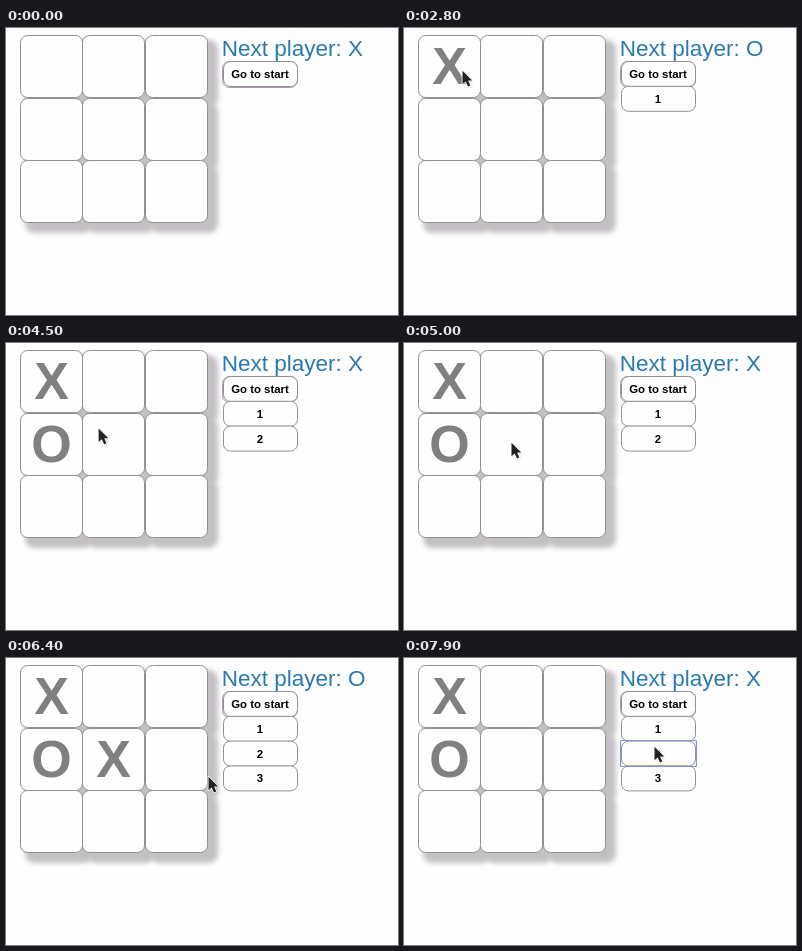
An HTML page that plays this animation: 392x287 px, repeating every 8 s.

```html
<!DOCTYPE html>
<html lang="en">
<head>
<meta charset="utf-8">
<title>Tic-tac-toe</title>
<style>
  html, body { margin: 0; width: 100%; height: 100%; overflow: hidden; background: #fefefe; }
  svg { display: block; font-family: "Liberation Sans", Arial, sans-serif; }
  .cell, .button { fill: #fefefe; stroke: #929092; }
  .shadow { fill: #c3c0c3; filter: url(#soft); }
  .mark { font-size: 52px; font-weight: bold; fill: #808080; text-anchor: middle; }
  .label { font-size: 11.4px; font-weight: bold; fill: #000; text-anchor: middle; }
  .status { font-size: 22.5px; fill: #2a7ab0; }
</style>
</head>
<body>
<svg id="stage" width="392" height="287" viewBox="0 0 392 287">
  <defs>
    <filter id="soft" x="-20%" y="-20%" width="140%" height="140%"><feGaussianBlur stdDeviation="2.4"/></filter>
    <filter id="haze" x="-50%" y="-50%" width="200%" height="200%"><feGaussianBlur stdDeviation="1"/></filter>
  </defs>
</svg>
<script>
const LOOP = 8000, TICK = 100;
const PLAYERS = 'XO';
const playedCells = [0, 3, 4];
const playTimes = [1300, 3700, 5400];
const focusTime = 7200, jumpTime = 7400, jumpMove = 2;

// The pointer rests at `to` after each glide and moves once per tick.
const glides = [
  { start: 500, ticks: 1, to: [79, 42] },
  { start: 700, ticks: 3, to: [58, 42] },
  { start: 3000, ticks: 4, to: [54, 110] },
  { start: 4500, ticks: 2, to: [113, 71] },
  { start: 4800, ticks: 3, to: [107, 99] },
  { start: 6100, ticks: 4, to: [202, 118] },
  { start: 6600, ticks: 5, to: [243, 103] },
  { start: 7900, ticks: 1, to: [250, 88] }
];

const stage = document.getElementById('stage');

function add(tag, attrs, text = '', parent = stage) {
  const el = document.createElementNS('http://www.w3.org/2000/svg', tag);
  for (const key in attrs) el.setAttribute(key, attrs[key]);
  el.textContent = text;
  return parent.appendChild(el);
}
const box = (className, x, y, width, height, rx, parent) =>
  add('rect', { class: className, x, y, width, height, rx }, '', parent);
const show = (el, on) => { el.style.display = on ? '' : 'none'; };
const easeOut = p => 1 - (1 - p) ** 1.5;

// Cell edges snap to whole pixels.
const cellX = i => 14.5 + Math.floor(62.5 * (i % 3));
const cellY = i => 7.5 + Math.round(62.5 * Math.floor(i / 3));

for (let i = 0; i < 9; i++) {
  box('shadow', cellX(i) + 4.5, cellY(i) + 4.5, 68, 68, 9);
  box('cell', cellX(i), cellY(i), 62, 62, 7);
}

const marks = playedCells.map((cell, i) =>
  add('text', { class: 'mark', x: cellX(cell) + 31, y: cellY(cell) + 48.8 }, PLAYERS[i % 2]));

const status = add('text', { class: 'status', x: 215.7, y: 28 });

const buttons = ['Go to start', '1', '2', '3'].map((text, i) => {
  const group = add('g', {});
  const y = 33.5 + 24.8 * i;
  if (i === 0) {
    add('rect', { x: 216.5, y, width: 75, height: 26, rx: 7, fill: 'none', stroke: '#a99aab' }, '', group);
  }
  box('button', 217.5, y, 74, 25, 7, group);
  add('text', { class: 'label', x: 254, y: y + 16.5 }, text, group);
  return group;
});

const focusRing = add('rect', {
  x: 216.5, y: 82.5, width: 76, height: 26, rx: 1, fill: 'none', stroke: '#8791dc', 'stroke-width': 1.2
});

const pointer = add('g', {});
const arrow = 'M.5 .7V14.2L3.7 11.4L6 16.5L8.3 15.5L6.1 10.5H10.2Z';
add('path', { d: arrow, transform: 'translate(1 1)', opacity: .25, filter: 'url(#haze)' }, '', pointer);
add('path', {
  d: arrow, fill: '#222', stroke: '#fff', 'stroke-width': 1.6, 'stroke-linejoin': 'round', 'paint-order': 'stroke'
}, '', pointer);

function pointerAt(t) {
  const index = glides.findLastIndex(glide => glide.start <= t);
  if (index < 0) return null;
  const { start, ticks, to } = glides[index];
  const from = index ? glides[index - 1].to : to;
  const p = easeOut(Math.min(1, (Math.floor((t - start) / TICK) + 1) / ticks));
  return to.map((end, axis) => from[axis] + (end - from[axis]) * p);
}

function draw() {
  const t = performance.now() % LOOP;
  const played = playTimes.filter(time => time <= t).length;
  const shown = t < jumpTime ? played : jumpMove;
  marks.forEach((el, i) => show(el, i < shown));
  buttons.forEach((el, i) => show(el, i <= played));
  status.textContent = 'Next player: ' + PLAYERS[shown % 2];
  show(focusRing, t >= focusTime);
  const position = pointerAt(t);
  show(pointer, position);
  if (position) pointer.setAttribute('transform', `translate(${position})`);
  requestAnimationFrame(draw);
}
draw();
</script>
</body>
</html>
```
